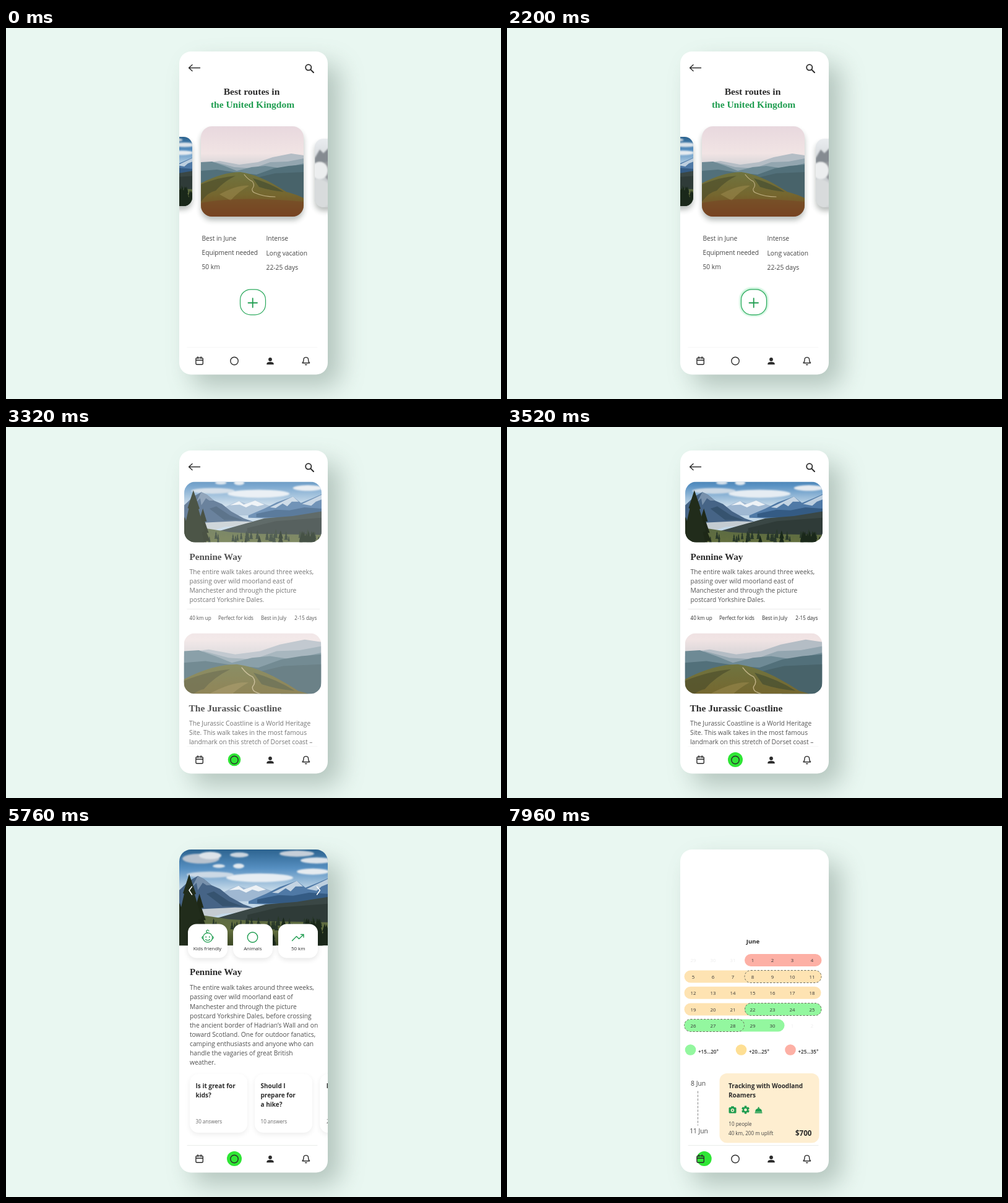
Recreate the animation shown at these times as an HTML page. Size 800 by 600 pixels, loop 8 s.

```html
<!DOCTYPE html>
<html lang="en">
<head>
<meta charset="utf-8">
<title>Hiking routes</title>
<style>
html, body { margin: 0; width: 100%; height: 100%; overflow: hidden; background: #e9f7f1; }
svg { display: block; font-family: "Open Sans", "Noto Sans", sans-serif; }
.serif { font-family: "Liberation Serif", "Noto Serif", serif; font-weight: 700; }
.bold { font-weight: 700; }
.line { fill: none; stroke-linecap: round; stroke-linejoin: round; }
</style>
</head>
<body>
<svg id="stage" width="800" height="600" viewBox="0 0 800 600"></svg>
<script>
const DARK = '#2b2b2b', GREEN = '#1f9d50', LIME = '#2fe635';
const RED = '#fdb0a5', PEACH = '#fee3b2', MINT = '#93f79f';

let seed = 7;
const rand = () => (seed = (seed * 16807) % 2147483647) / 2147483647;

// Drawing helpers
const text = (x, y, s, size, fill = '#444', extra = '') =>
  `<text x="${x}" y="${y}" font-size="${size}" fill="${fill}" ${extra}>${s}</text>`;
const lines = (x, y, step, list, size, fill, extra) =>
  list.map((s, i) => text(x, y + i * step, s, size, fill, extra)).join('');
const rect = (x, y, w, h, r, fill, extra = '') =>
  `<rect x="${x}" y="${y}" width="${w}" height="${h}" rx="${r}" fill="${fill}" ${extra}/>`;
const poly = (pts, fill, extra = '') => `<polygon points="${pts}" fill="${fill}" ${extra}/>`;
const line = (d, stroke, w, extra = '') =>
  `<path class="line" d="${d}" stroke="${stroke}" stroke-width="${w}" ${extra}/>`;
const dot = (x, y, r, fill, extra = '') => `<circle cx="${x}" cy="${y}" r="${r}" fill="${fill}" ${extra}/>`;
const group = (id, body, extra = '') => `<g id="${id}" ${extra}>${body}</g>`;
const fade = (id, stops) =>
  `<linearGradient id="${id}" x2="0" y2="1">${stops.map(([o, c]) =>
    `<stop offset="${o}" stop-color="${c}"/>`).join('')}</linearGradient>`;
const blur = (id, d) =>
  `<filter id="${id}" x="-50%" y="-50%" width="200%" height="200%"><feGaussianBlur stdDeviation="${d}"/></filter>`;
const cloud = (x, y, rx, ry, c) => `<ellipse cx="${x}" cy="${y}" rx="${rx}" ry="${ry}" fill="${c}"/>`;

const card = (x, y, w, h, r, shade = .1) =>
  rect(x, y + 3, w, h, r, '#000', `opacity="${shade}" filter="url(#soft)"`) + rect(x, y, w, h, r, '#fff');

let clips = 0;
function photo(id, x, y, w, h, r) {
  const clip = 'clip' + clips++;
  return `<clipPath id="${clip}">${rect(x, y, w, h, r, '#000')}</clipPath>
    <g clip-path="url(#${clip})"><use href="#${id}" x="${x}" y="${y}" width="${w}" height="${h}"/></g>`;
}
const shadow = (x, y, w, h, r) => rect(x, y + 6, w, h, r, '#1c2b24', 'opacity=".3" filter="url(#soft)"');

function tree(x, base, h) {
  const w = h * .2;
  return `M${x},${base - h}l${w * .6},${h * .4}h${-w * .3}l${w * .6},${h * .35}h${-w * .3}l${w * .5},${h * .25}`
    + `h${-w * 2.2}l${w * .5},${-h * .25}h${-w * .3}l${w * .6},${-h * .35}h${-w * .3}z`;
}
function forest(n, x0, x1, base, spread, h, fill) {
  let d = '';
  for (let i = 0; i < n; i++) d += tree(x0 + (x1 - x0) * rand(), base + spread * rand(), h * (.6 + .5 * rand()));
  return `<path d="${d}" fill="${fill}"/>`;
}

// Landscapes
const scene = (id, w, h, body) =>
  `<symbol id="${id}" viewBox="0 0 ${w} ${h}" preserveAspectRatio="xMidYMid slice">${body}</symbol>`;

const lake = scene('lake', 240, 156,
  rect(0, 0, 240, 156, 0, 'url(#lakeSky)')
  + `<g filter="url(#puff)">${cloud(35, 15, 30, 8, '#b9c3cf')}${cloud(50, 10, 18, 6, '#dde3e9')}
    ${cloud(97, 9, 15, 4, '#cbd5df')}${cloud(64, 27, 10, 3, '#dbe4ec')}${cloud(96, 27, 9, 4, '#e2e9ef')}
    ${cloud(190, 7, 28, 5, '#c6cfd9')}${cloud(222, 18, 26, 5, '#dce3ea')}${cloud(216, 36, 26, 5, '#e6ebf0')}
    ${cloud(130, 46, 54, 7, '#e6edf3')}${cloud(50, 41, 38, 5, '#ccd9e5')}</g>`
  + poly('70,70 84,63 96,59 108,63 124,58 138,63 152,68 152,84 70,84', '#9fb8d2')
  + poly('80,66 96,59 104,65 124,58 140,65 128,68 118,65 108,70 97,65', '#edf2f6')
  + poly('0,66 16,51 30,43 40,48 52,58 66,64 82,77 104,89 124,96 0,100', '#466486')
  + poly('30,43 40,48 52,58 44,58 38,54 30,66 28,54 20,62', '#7891ac')
  + poly('44,72 56,68 80,84 102,92 70,92', '#36536f')
  + poly('112,84 140,72 162,61 190,51 204,62 224,54 240,47 240,92 112,88', '#4f79a6')
  + poly('150,70 190,51 200,60 188,60 180,68 172,63 160,71', '#c4d4e3')
  + poly('206,64 240,48 240,56 230,60 222,67', '#bdcfdf')
  + poly('126,81 160,74 184,75 210,70 240,72 240,88 126,87', '#345b84')
  + poly('28,97 90,94 126,95 104,102 70,104 44,112 28,112', '#c4ccd2')
  + poly('58,112 104,99 140,89 190,85 240,77 240,130 58,130', '#3a4745')
  + poly('110,106 160,94 240,88 240,120 110,120', '#2f3b38')
  + poly('0,112 40,107 80,113 130,116 240,118 240,156 0,156', 'url(#meadow)')
  + forest(34, 44, 240, 122, 10, 15, '#28382a')
  + forest(15, 100, 240, 146, 14, 34, '#192819')
  + forest(10, 195, 240, 146, 12, 42, '#1a281a')
  + forest(13, 0, 34, 128, 30, 58, '#1e2817')
  + poly(tree(16, 156, 114).length ? '16,40 27,72 25,73 36,112 31,113 40,156 -2,156 2,112 -1,111 8,72 6,71' : '', '#212c1b'));

const hills = scene('hills', 166, 146,
  rect(0, 0, 166, 146, 0, 'url(#dusk)')
  + poly('0,60 30,56 62,62 92,58 116,50 146,44 166,47 166,90 0,90', '#b4bdc5')
  + poly('0,64 24,58 54,66 84,68 112,58 140,57 166,52 166,95 0,95', '#93a6b0')
  + poly('0,58 18,57 38,64 58,72 82,66 104,64 130,68 166,60 166,104 0,100', '#6e8a95')
  + poly('0,72 26,70 60,75 90,78 118,68 142,64 166,62 166,118 100,112 0,96', '#52707a')
  + poly('86,84 120,76 166,74 166,120 120,112', '#48636a')
  + '<path d="M0,92C24,80 44,74 64,74C92,78 116,92 138,106Q154,110 166,116V146H0Z" fill="url(#grass)"/>'
  + '<path d="M0,94Q30,82 56,80Q36,90 24,104Q12,106 0,122Z" fill="#4c4e2c" opacity=".65"/>'
  + '<path d="M84,84Q112,92 134,106Q112,104 94,98Z" fill="#3f4a31" opacity=".6"/>'
  + '<path d="M30,110Q60,94 78,96Q60,106 48,120Z" fill="#98874c" opacity=".6"/>'
  + '<path d="M0,124Q60,112 166,122V146H0Z" fill="#7a4325" opacity=".5"/>'
  + line('M70,78Q76,86 83,89Q88,95 83,101Q82,106 88,108Q102,114 120,114', '#cdbd92', 1.1, 'opacity=".85"'));

const fog = scene('fog', 125, 112,
  rect(0, 0, 125, 112, 0, 'url(#mist)')
  + `<g filter="url(#puff)">${poly('0,32 8,18 14,24 24,14 40,34 125,30 125,52 0,42', '#858b91')}
    ${poly('12,40 26,36 40,66 30,76 16,62', '#94999d')}${cloud(8, 52, 13, 14, '#eceeef')}${cloud(4, 90, 26, 24, '#d8dbdc')}</g>`);

// Screens
const arrow = line('M295.5,64.5H313.5M301,59.5L295.5,64.5L301,69.5', DARK, 1.4);
const search = dot(488.8, 63.8, 4.6, 'none', `stroke="${DARK}" stroke-width="1.8"`) + line('M492.4,67.4L497,72', DARK, 2);

const home =
  text(397, 108, 'Best routes in', 15.6, DARK, 'class="serif" text-anchor="middle"')
  + text(398.5, 129, 'the United Kingdom', 15.5, GREEN, 'class="serif" text-anchor="middle"')
  + shadow(176, 176, 125, 112, 14)
  + `<svg x="176" y="0" width="125" height="600" viewBox="176 0 125 600">
     ${photo('lake', 129, 176, 172, 112, 14)}</svg>`
  + shadow(499, 179, 125, 111, 14) + photo('fog', 499, 179, 125, 111, 14)
  + shadow(315, 159, 166, 146, 18) + photo('hills', 315, 159, 166, 146, 18)
  + lines(316.5, 343.5, 23, ['Best in June', 'Equipment needed', '50 km'], 10.2, '#444')
  + lines(420.5, 344.3, 23.2, ['Intense', 'Long vacation', '22-25 days'], 10.3, '#444')
  + rect(378.5, 422.5, 41, 41, 17, 'none', 'id="glow" stroke="#7fe3a6" filter="url(#puff)"')
  + rect(378.5, 422.8, 41, 41, 17, '#fff', 'stroke="#2aa95c" stroke-width="1.2"')
  + line('M391.5,444.5H406M398.7,437.2V451.8', GREEN, 1.8);

const list =
  photo('lake', 288, 88.5, 222, 98, 18)
  + text(296.5, 215, 'Pennine Way', 15.1, DARK, 'class="serif"')
  + lines(296.5, 237.5, 15.15, ['The entire walk takes around three weeks,', 'passing over wild moorland east of',
    'Manchester and through the picture', 'postcard Yorkshire Dales.'], 10.25, '#555')
  + line('M293,294.5H507', '#ececec', 1)
  + [[296.5, '40 km up'], [343, 'Perfect for kids'], [412, 'Best in July'], [466.3, '2-15 days']]
    .map(([x, s]) => text(x, 312.3, s, 8.1, DARK)).join('')
  + photo('hills', 287.5, 333.5, 222, 98, 18)
  + text(295.5, 460, 'The Jurassic Coastline', 15.5, DARK, 'class="serif"')
  + lines(296, 482.5, 15.15, ['The Jurassic Coastline is a World Heritage', 'Site. This walk takes in the most famous',
    'landmark on this stretch of Dorset coast –'], 10.25, '#555');

const baby = dot(326, 180.5, 7.6, 'none', `stroke="${GREEN}" stroke-width="1.3"`)
  + line('M318.2,178.5q-3,2 0,4M333.8,178.5q3,2 0,4M326,173q-3.5,-2 -1.5,-4t3.5,1M322.5,183.5q3.5,3 7,0', GREEN, 1.2)
  + dot(323.2, 179.5, 1, GREEN) + dot(328.8, 179.5, 1, GREEN);
const rise = line('M462.5,185.5L469.5,178.5L473.5,182.5L481,175.5M476.5,175.5H481V180', GREEN, 1.4);
const badges = [294, 367, 440].map(x => card(x, 158.5, 64, 55, 14)).join('')
  + baby + dot(398.5, 180, 8.2, 'none', `stroke="${GREEN}" stroke-width="1.4"`) + rise
  + [[325.5, 'Kids friendly'], [398.8, 'Animals'], [472.3, '50 km']]
    .map(([x, s]) => text(x, 201.3, s, 7.9, DARK, 'text-anchor="middle"')).join('');

const questions = [297, 402, 507].map(x => card(x, 401, 93, 95, 14, .07)).join('')
  + lines(306.5, 424, 15, ['Is it great for', 'kids?'], 10, DARK, 'class="bold"')
  + lines(411.5, 424, 15, ['Should I', 'prepare for', 'a hike?'], 10, DARK, 'class="bold"')
  + text(306.5, 481, '30 answers', 8.1, '#666') + text(411.5, 481, '10 answers', 8.1, '#666');

const detail =
  photo('lake', 280, 38, 240, 155.5, 0)
  + line('M300.5,98L296,104L300.5,111M502.5,98L507.5,104L502.5,111', '#fff', 1.5)
  + lines(297, 265.3, 15.13, ['The entire walk takes around three weeks,', 'passing over wild moorland east of',
    'Manchester and through the picture', 'postcard Yorkshire Dales, before crossing',
    'the ancient border of Hadrian’s Wall and on', 'toward Scotland. One for outdoor fanatics,',
    'camping enthusiasts and anyone who can', 'handle the vagaries of great British', 'weather.'], 10.25, '#505050')
  + group('badges', badges)
  + group('heading', text(297, 241, 'Pennine Way', 15, DARK, 'class="serif"'))
  + group('questions', questions)
  + text(517.8, 424, 'Is it safe?', 10, DARK, 'class="bold"') + text(518, 481, '20 answers', 8.1, '#666');

// Calendar: one group per row, so that they can appear in turn
const pill = (x, y, w, fill) => rect(x, y, w, 20, 10, fill);
const dashes = (x, y, w) => rect(x, y, w, 20, 10, 'none', 'stroke="#6d6d5d" stroke-width="1" stroke-dasharray="3 2.4"');
const bars = [
  pill(384, 207, 124.5, RED),
  pill(286.5, 233.5, 222, PEACH) + dashes(384, 233.5, 124),
  pill(286.5, 259.8, 221, PEACH),
  pill(286.5, 286.5, 160, PEACH) + pill(384, 286.5, 124.5, MINT) + dashes(384.5, 286.5, 123.5),
  pill(286.5, 312.5, 162, MINT) + dashes(286.5, 312.5, 97)
];
const week = r => Array.from({ length: 7 }, (_, c) => {
  const n = r * 7 + c - 2, out = n < 1 || n > 30;
  const day = n < 1 ? n + 31 : n > 30 ? n - 30 : n;
  return text(301 + c * 32, 220 + r * 26.5, day, 7.8, out ? '#ececec' : '#333', 'text-anchor="middle" font-weight="500"');
}).join('');
const legend = [[296.5, 309, MINT, '+15...20°'], [378.5, 391, '#fedf94', '+20...25°'], [458, 470.5, RED, '+25...35°']]
  .map(([x, tx, c, s]) => dot(x, 362, 8.8, c) + text(tx, 367.5, s, 8, DARK, 'font-weight="600"')).join('');
const gear = Array.from({ length: 6 }, (_, i) =>
  `<rect x="383.6" y="452.6" width="3.8" height="4" rx=".8" transform="rotate(${i * 60} 385.5 459)"/>`).join('');
const trip = text(297, 420, '8 Jun', 10.4) + text(295.3, 497, '11 Jun', 10.2)
  + line('M308.5,429V484', '#888', 1, 'stroke-dasharray="3 3"')
  + rect(343.5, 400, 161, 112.5, 12, '#feeed0')
  + lines(358, 424, 15, ['Tracking with Woodland', 'Roamers'], 10, DARK, 'class="bold"')
  + `<g fill="${GREEN}">${rect(358.5, 455, 12, 9.5, 1.5, GREEN)}${rect(362, 453.3, 5, 3, 1, GREEN)}${gear}
     ${dot(385.5, 459, 4.6, GREEN)}<path d="M401,462.5a5.6,6 0 0 1 11.2,0z"/>${rect(400.5, 463, 12, 1.4, .5, GREEN)}
     ${dot(406.6, 455.8, 1.2, GREEN)}</g>`
  + dot(364.5, 459.8, 2.7, '#feeed0') + dot(364.5, 459.8, 1.2, GREEN) + dot(385.5, 459, 2.3, '#feeed0')
  + text(358.3, 485, '10 people', 8.1) + text(358, 500.3, '40 km, 200 m uplift', 8.1)
  + text(466, 500.5, '$700', 11.6, DARK, 'class="bold"');
const parts = [text(397.5, 190, 'June', 9.6, DARK, 'class="bold" text-anchor="middle"'),
  ...bars.map((b, r) => b + week(r)), legend, trip];

const icons =
  line('M308.8,533.5H316.3Q318.3,533.5 318.3,535.5V542.3Q318.3,544.2 316.3,544.2H308.8Q306.9,544.2 306.9,542.3V535.5Q306.9,533.5 308.8,533.5M306.9,537.2H318.3M310,531.8V534.6M315.2,531.8V534.6', DARK, 1.4)
  + dot(369, 538.5, 6.2, 'none', `stroke="${DARK}" stroke-width="1.4"`)
  + dot(427, 536, 2.9, DARK) + `<path d="M421.3,544.3V543Q421.5,540 427,540T432.7,543V544.3Z" fill="${DARK}"/>`
  + line('M479,541.8Q481,540 481,536.5Q481,532.6 484.8,532.6T488.6,536.5Q488.6,540 490.6,541.8ZM483.6,544.2Q484.8,545.3 486,544.2', DARK, 1.4);

const stage = document.getElementById('stage');
stage.innerHTML = `<defs>
  ${blur('soft', 4)}${blur('puff', 1.2)}${blur('far', 20)}
  ${fade('lakeSky', [[0, '#2c638f'], [.2, '#5790c2'], [.42, '#c3d8e8']])}
  ${fade('meadow', [[0, '#5b6a43'], [.5, '#64703f'], [1, '#3c4926']])}
  ${fade('dusk', [[0, '#e8d8de'], [.3, '#f1e4e4'], [.5, '#c9ccd1']])}
  ${fade('grass', [[0, '#6f7440'], [.5, '#75672f'], [1, '#754420']])}
  ${fade('mist', [[0, '#eaedf0'], [.5, '#c9cdd0'], [1, '#cfd2d4']])}
  ${lake}${hills}${fog}
  <clipPath id="phone">${rect(280, 38, 240, 522.5, 19, '#000')}</clipPath>
  <clipPath id="above">${rect(280, 38, 240, 478, 0, '#000')}</clipPath></defs>
  ${rect(0, 0, 800, 600, 0, '#e9f7f1')}
  ${rect(300, 58, 240, 522, 20, '#4c6458', 'opacity=".34" filter="url(#far)"')}
  ${rect(280, 38, 240, 522.5, 19, '#fff')}
  <g clip-path="url(#phone)">
    ${group('home', home)}
    ${group('list', list, 'clip-path="url(#above)"')}
    ${group('top', arrow + search)}
    ${group('detail', detail)}
    ${group('plan', parts.map((p, i) => group('part' + i, p)).join(''))}
    ${line('M293,516.5H503', '#e9ecea', 1, 'id="rule"')}
    ${dot(369, 538, 12, LIME, 'id="spot"')}
    ${group('icons', icons)}
  </g>`;

const el = id => document.getElementById(id);
const show = (id, v) => { el(id).style.opacity = v; el(id).style.display = v > 0 ? '' : 'none'; };
const ease = (t, a, b) => { const p = Math.min(1, Math.max(0, (t - a) / (b - a))); return p * p * (3 - 2 * p); };
function enter(id, t, a, b, dy) {
  const p = ease(t, a, b);
  show(id, p);
  el(id).setAttribute('transform', `translate(0 ${dy * (1 - p)})`);
}

const LOOP = 8000, OPEN = 5360, PLAN = 7640;

function draw(t) {
  const early = t < OPEN, late = t >= PLAN;
  show('home', early ? 1 - ease(t, 2570, 2960) : 0);
  show('list', early ? ease(t, 2820, 3520) : 0);
  show('top', early ? 1 : 0);
  show('detail', early || late ? 0 : 1);
  show('plan', late ? 1 : 0);
  show('rule', early ? .4 : 1);

  const beat = t < 2560 ? Math.sin(Math.PI * (t % 840) / 840) : 0;
  el('glow').setAttribute('stroke-width', 1 + 5 * beat);
  el('glow').style.opacity = .5 * beat;

  enter('badges', t, OPEN, 5640, 8);
  enter('heading', t, 5400, 5700, 5);
  enter('questions', t, 5420, 5760, 8);
  show('icons', early || late ? 1 : ease(t, OPEN, 5640));
  parts.forEach((_, i) => enter('part' + i, t, PLAN + i * 14, 7850 + i * 14, 8));

  el('spot').setAttribute('r', 12 * ease(t, 2800, 3480));
  el('spot').setAttribute('cx', 369 - 56 * ease(t, PLAN, 8040));
}

const start = performance.now();
function tick() {
  draw((performance.now() - start) % LOOP);
  requestAnimationFrame(tick);
}
draw(0);
requestAnimationFrame(tick);
</script>
</body>
</html>
```
